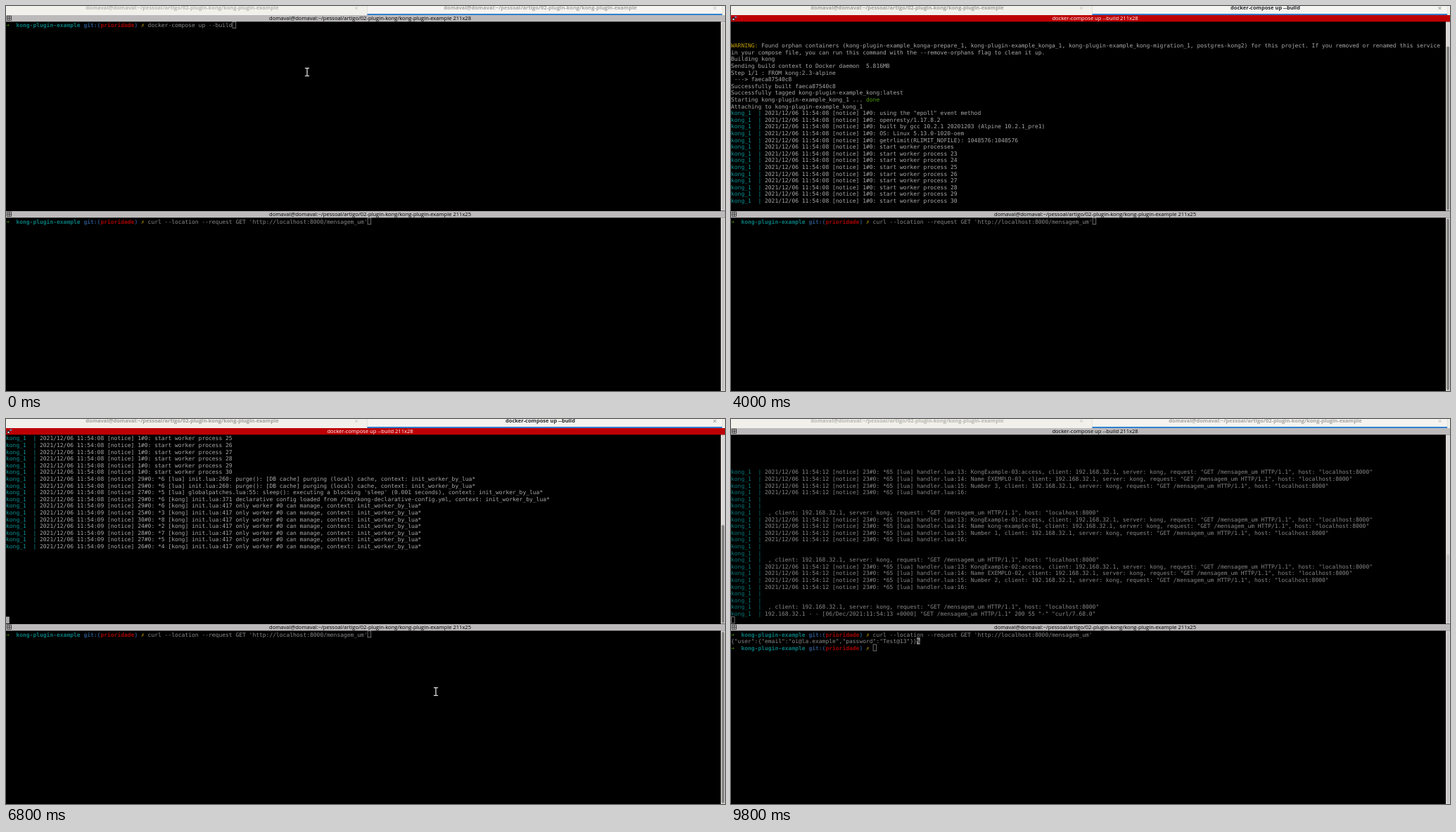
An HTML page with a canvas for the animation above (9900 ms loop, 1022 by 548 pixels).

```html
<!DOCTYPE html>
<html lang="pt">
<head>
<meta charset="utf-8">
<title>Terminal</title>
<style>
  html, body { margin: 0; width: 100%; height: 100%; overflow: hidden; background: #000; }
  canvas { display: block; }
</style>
</head>
<body>
<canvas id="stage" width="1022" height="548"></canvas>
<script>
const ctx = document.getElementById('stage').getContext('2d');
const LOOP = 9900, CELL = 4.8, ROW = 9.6, ROWS = 28;
const MONO = '"DejaVu Sans Mono", monospace', SANS = '"Open Sans", "Noto Sans", sans-serif';
const C = { fg: '#aaaaaa', red: '#cc0000', green: '#4e9a06', yellow: '#c4a000',
            blue: '#3465a4', cyan: '#06989a' };

const CWD = 'domaval@domaval:~/pessoal/artigo/02-plugin-kong/kong-plugin-example';
const BUILD = 'docker-compose up --build';
const CURL = "curl --location --request GET 'http://localhost:8000/mensagem_um'";
const TOP_PANE = { bar: 13, y: 22.8, end: 291.5 };
const LOW_PANE = { bar: 292, y: 302.1, end: 548 };

// Output of the upper terminal: each line with the time it shows up.
const log = [];
const print = (time, ...lines) => lines.forEach(text => log.push({ time, text }));
const notice = (time, clock, ...lines) =>
  print(time, ...lines.map(s => `kong_1  | 2021/12/06 11:54:${clock} [notice] ${s}`));

for (const time of [1600, 1700, 1800]) print(time, '', '');
print(1900,
  'WARNING: Found orphan containers (kong-plugin-example_konga-prepare_1, kong-plugin-example_konga_1, ' +
  'kong-plugin-example_kong-migration_1, postgres-kong2) for this project. If you removed or renamed this service',
  'in your compose file, you can run this command with the --remove-orphans flag to clean it up.',
  'Building kong');
print(2100, 'Sending build context to Docker daemon  5.816MB');
print(2200, 'Step 1/1 : FROM kong:2.3-alpine', ' ---> faeca87540c8', 'Successfully built faeca87540c8',
  'Successfully tagged kong-plugin-example_kong:latest');
print(2300, 'Starting kong-plugin-example_kong_1 ...');
print(2900, 'Attaching to kong-plugin-example_kong_1');
notice(4000, '08', ...['using the "epoll" event method', 'openresty/1.17.8.2',
  'built by gcc 10.2.1 20201203 (Alpine 10.2.1_pre1)', 'OS: Linux 5.13.0-1020-oem',
  'getrlimit(RLIMIT_NOFILE): 1048576:1048576', 'start worker processes',
  ...Array.from({ length: 8 }, (_, i) => 'start worker process ' + (23 + i))].map(s => '1#0: ' + s));
const CONTEXT = ', context: init_worker_by_lua*';
const purge = '29#0: *6 [lua] init.lua:260: purge(): [DB cache] purging (local) cache' + CONTEXT;
notice(4100, '08', purge, purge,
  "27#0: *5 [lua] globalpatches.lua:55: sleep(): executing a blocking 'sleep' (0.001 seconds)" + CONTEXT,
  '29#0: *6 [kong] init.lua:371 declarative config loaded from /tmp/kong-declarative-config.yml' + CONTEXT);
notice(4200, '09', ...['29#0: *6', '25#0: *3', '30#0: *8', '24#0: *2', '28#0: *7', '27#0: *5', '26#0: *4']
  .map(id => id + ' [kong] init.lua:417 only worker #0 can manage' + CONTEXT));
for (const time of [6000, 6200, 6300, 6300, 6400, 6500, 6500, 6600, 6800, 6800]) print(time, '');
const REQUEST = ', client: 192.168.32.1, server: kong, request: "GET /mensagem_um HTTP/1.1", host: "localhost:8000"';
for (const [n, name] of [[3, 'EXEMPLO-03'], [1, 'kong-example-01'], [2, 'EXEMPLO-02']]) {
  const handler = '23#0: *65 [lua] handler.lua:';
  notice(7500, '12', `${handler}13: KongExample-0${n}:access${REQUEST}`,
    `${handler}14: Name ${name}${REQUEST}`, `${handler}15: Number ${n}${REQUEST}`, handler + '16:');
  print(7500, 'kong_1  |', 'kong_1  |', 'kong_1  |  ' + REQUEST);
}
print(8700, 'kong_1  | 192.168.32.1 - - [06/Dec/2021:11:54:13 +0000] "GET /mensagem_um HTTP/1.1" 200 55 "-" "curl/7.68.0"');

const within = (t, a, b) => t >= a && t < b;

function rect(color, x, y, w, h) {
  ctx.fillStyle = color;
  ctx.fillRect(x, y, w, h);
}

function type(text, col, y, color = C.fg, bold = false) {
  ctx.font = `${bold ? 'bold ' : ''}7.97px ${MONO}`;
  ctx.textAlign = 'left';
  ctx.fillStyle = color;
  [...text].forEach((ch, i) => { if (ch !== ' ') ctx.fillText(ch, (col + i) * CELL, y + 7.5); });
}

function prompt(y, command = '') {
  type('➜', 0, y, C.green, true);
  type('kong-plugin-example', 3, y, C.cyan, true);
  type('git:(', 23, y, C.blue, true);
  type('prioridade', 28, y, C.red, true);
  type(')', 38, y, C.blue, true);
  type('✗', 40, y, C.yellow, true);
  type(command, 42, y);
}

function outputLine(text, y) {
  const [, head, rest] = text.match(/^(kong_1  \||WARNING:)?(.*)$/);
  if (head) type(head, 0, y, head[0] === 'W' ? C.yellow : C.cyan);
  type(rest, head ? head.length : 0, y);
}

function block(col, y, filled) {
  if (filled) return rect(C.fg, col * CELL, y - 0.6, CELL, ROW);
  ctx.strokeStyle = C.fg;
  ctx.lineWidth = 0.8;
  ctx.strokeRect(col * CELL + 0.5, y - 0.4, CELL - 0.2, ROW - 0.5);
}

function titleBar(pane, title, active) {
  const y = pane.bar;
  rect(active ? '#bd0004' : '#bcbabb', 0, y, 1022, 9.3);
  if (active) {
    rect('#26282c', 1.5, y + 3.5, 4, 4);
    rect('#e8e8e8', 2.5, y + 5, 2, 2);
    rect('#5b86b8', 5.5, y + 1.5, 2.5, 2.5);
  } else {
    ctx.strokeStyle = '#222';
    ctx.lineWidth = 0.8;
    ctx.strokeRect(1.5, y + 1.2, 6, 6);
    rect('#222', 4.1, y + 1.2, 0.8, 6);
    rect('#222', 1.5, y + 3.8, 6, 0.8);
  }
  label(title, 517.5, y + 7.2, active ? '#ffffff' : '#000000', `7.58px ${SANS}`);
}

function label(text, x, y, color, font) {
  ctx.font = font;
  ctx.textAlign = 'center';
  ctx.fillStyle = color;
  ctx.fillText(text, x, y);
}

function closeMark(x, color) {
  ctx.strokeStyle = color;
  ctx.lineWidth = 0.8;
  ctx.beginPath();
  ctx.moveTo(x - 2, 1); ctx.lineTo(x + 2, 5);
  ctx.moveTo(x + 2, 1); ctx.lineTo(x - 2, 5);
  ctx.stroke();
}

function tabs(title, focused) {
  rect('#f1f0eb', 0, 0, 1022, 13);
  rect('#f5f4f0', 513.5, 0, 504.5, 13);
  rect('#dcdad5', 513, 0, 0.7, 13);
  rect('#dcdad5', 1018, 0, 0.7, 13);
  rect('#3280cf', 513.5, 11, 504.5, 2);
  const font = `bold 7.5px ${SANS}`;
  label(CWD, 250.5, 5.4, focused ? '#a09f9b' : '#b6b5b0', font);
  label(title, 759.5, 5.4, focused ? '#22262a' : '#a3a29e', font);
  closeMark(498, '#c2c0bb');
  closeMark(1007.5, focused ? '#77767a' : '#b6b5b0');
}

function scrollbar(pane, hidden, focused) {
  const top = pane.bar + 9.3, height = pane.end - top;
  const start = height * hidden / (ROWS + hidden);
  rect('#dad8d6', 1016, top, 6, height);
  ctx.fillStyle = focused ? '#858482' : '#c6c4c2';
  ctx.beginPath();
  ctx.roundRect(1017.2, top + start + 1.5, 3.8, height - start - 2.5, 1.9);
  ctx.fill();
}

function pointer(x, y) {
  ctx.lineCap = 'round';
  for (const [color, width] of [['#222', 2.4], ['#e6e6e6', 1.1]]) {
    ctx.strokeStyle = color;
    ctx.lineWidth = width;
    ctx.beginPath();
    ctx.moveTo(x - 2.5, y - 5.5); ctx.lineTo(x + 2.5, y - 5.5);
    ctx.moveTo(x, y - 5.5); ctx.lineTo(x, y + 5.5);
    ctx.moveTo(x - 2.5, y + 5.5); ctx.lineTo(x + 2.5, y + 5.5);
    ctx.stroke();
  }
  ctx.lineCap = 'butt';
}

// Pointer trips: start and end time, from, to, time it vanishes.
const trips = [
  [600, 1200, 428, 94, 440, 243, 1600],
  [4600, 5600, 470, 175, 614, 364, 6200],
  [6100, 6600, 614, 364, 611, 388, 7200],
  [8700, 9300, 611, 388, 650, -10, 9400]
];

function drawPointer(t) {
  const trip = trips.find(([start, , , , , , gone], i) => t >= (i ? start + 100 : 0) && t < gone
    && !(i === 1 && t >= 6200));
  if (!trip) return;
  const [start, end, x0, y0, x1, y1] = trip;
  const p = Math.min(1, Math.max(0, (t - start) / (end - start)));
  const e = p * p * (3 - 2 * p);
  pointer(x0 + (x1 - x0) * e, y0 + (y1 - y0) * e);
}

function upperPane(t, active) {
  const lines = log.filter(line => line.time <= t);
  const count = lines.length + 1;
  const hidden = Math.max(0, count + 1 - ROWS);
  const rowY = i => TOP_PANE.y + (i - hidden) * ROW;
  if (!hidden) prompt(rowY(0), BUILD);
  lines.forEach(({ text }, i) => {
    if (i + 1 < hidden) return;
    outputLine(text, rowY(i + 1));
    if (t >= 2900 && text.startsWith('Starting')) type('done', text.length + 1, rowY(i + 1), C.green);
  });
  const blinkedOff = within(t, 2100, 2900) || within(t, 3500, 4100) || within(t, 4700, 5300);
  if (t < 1300) block(67, rowY(0), active);
  else if (!blinkedOff) block(0, rowY(count), active);
  return hidden;
}

function lowerPane(t, active) {
  const y = LOW_PANE.y;
  prompt(y, CURL);
  if (t < 7200) block(107, y, active);
  else if (t < 8700) {
    if (!within(t, 7900, 8400)) block(0, y + ROW, active);
  } else {
    const reply = '{"user":{"email":"oi@la.example","password":"Test@13"}}';
    type(reply, 0, y + ROW);
    block(reply.length, y + ROW, true);
    type('%', reply.length, y + ROW, '#000', true);
    prompt(y + 2 * ROW);
    block(42, y + 2 * ROW, active);
  }
}

function draw(t) {
  const focused = within(t, 1000, 9700);
  const topActive = within(t, 1000, 6900), lowActive = within(t, 6900, 9700);
  const topTitle = t < 1300 ? CWD : BUILD;
  const lowTitle = within(t, 7200, 8700) ? CURL : CWD;

  rect('#000', 0, 0, 1022, 548);
  ctx.globalAlpha = topActive ? 1 : 0.8;
  const hidden = upperPane(t, topActive);
  ctx.globalAlpha = lowActive ? 1 : 0.8;
  lowerPane(t, lowActive);
  ctx.globalAlpha = 1;

  scrollbar(TOP_PANE, hidden, focused);
  scrollbar(LOW_PANE, 0, focused);
  titleBar(TOP_PANE, topTitle + ' 211x28', topActive);
  titleBar(LOW_PANE, lowTitle + ' 211x25', lowActive);
  tabs(t < 6900 ? topTitle : lowTitle, focused);
  drawPointer(t);
}

function frame() {
  // The picture advances in steps of a tenth of a second.
  draw(Math.floor(performance.now() % LOOP / 100) * 100);
  requestAnimationFrame(frame);
}
frame();
</script>
</body>
</html>
```
